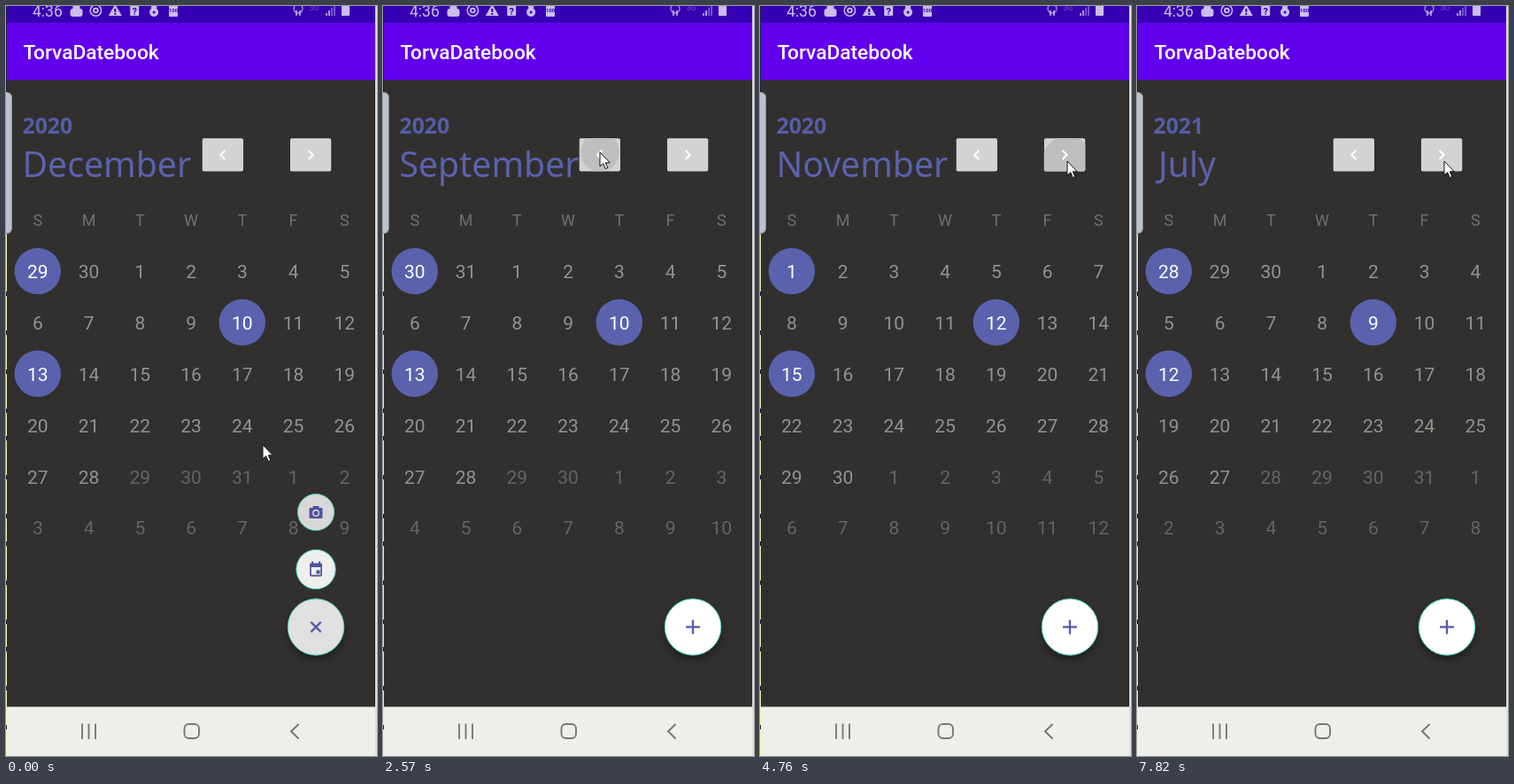
Animation of 419 by 846 pixels, one loop 8000 ms. Source, as an HTML page with a canvas:

```html
<!DOCTYPE html>
<html lang="en">
<head>
<meta charset="utf-8">
<title>Calendar</title>
<style>
html, body { margin: 0; width: 100%; height: 100%; overflow: hidden; background: #31302e; }
canvas { display: block; }
</style>
</head>
<body>
<canvas id="stage" width="419" height="846"></canvas>
<script>
const ctx = document.getElementById('stage').getContext('2d');
const LOOP = 8000;
const HOLD = 250;
const FADE = 130;
const RIPPLE_SPEED = 0.18;
const INDIGO = '#5a62ae';
const ICON_INK = '#4c529e';
const SANS = 'Roboto, sans-serif';
const HUMANIST = '"Noto Sans", "Open Sans", sans-serif';
const MONTHS = ['January', 'February', 'March', 'April', 'May', 'June', 'July',
  'August', 'September', 'October', 'November', 'December'];

// Release times of evenly repeated clicks.
const clicks = (first, gap, count) => Array.from({ length: count }, (_, i) => first + gap * i);
const BACK = [...clicks(660, 680, 4), 2970];
const FORWARD = [...clicks(3900, 238, 5), ...clicks(5390, 383, 7)];

const PARKED = { x: 290, y: 495 };
const ON_BACK = { x: 245, y: 165 };
const ON_FORWARD = { x: 347, y: 175 };

const clamp = v => Math.max(0, Math.min(1, v));
const progress = (t, from, to) => clamp((t - from) / (to - from));
const smooth = k => k * k * (3 - 2 * k);
const overshoot = k => 1 + 2.7 * (k - 1) ** 3 + 1.7 * (k - 1) ** 2;
const mix = (a, b, k) => ({ x: a.x + (b.x - a.x) * k, y: a.y + (b.y - a.y) * k });

function pointerAt(t) {
  return t < 3000
    ? mix(PARKED, ON_BACK, overshoot(progress(t, 40, 480)))
    : mix(ON_BACK, ON_FORWARD, smooth(progress(t, 3040, 3480)));
}

function rect(x, y, w, h, color, r = 0) {
  ctx.fillStyle = color;
  ctx.beginPath();
  ctx.roundRect(x, y, w, h, r);
  ctx.fill();
}

function disc(x, y, r, color) {
  ctx.fillStyle = color;
  ctx.beginPath();
  ctx.arc(x, y, r, 0, Math.PI * 2);
  ctx.fill();
}

function ring(x, y, r, color, width) {
  ctx.strokeStyle = color;
  ctx.lineWidth = width;
  ctx.beginPath();
  ctx.arc(x, y, r, 0, Math.PI * 2);
  ctx.stroke();
}

function line(x1, y1, x2, y2, color, width) {
  ctx.strokeStyle = color;
  ctx.lineWidth = width;
  ctx.beginPath();
  ctx.moveTo(x1, y1);
  ctx.lineTo(x2, y2);
  ctx.stroke();
}

function chevron(x, y, w, h, color, width) {
  ctx.strokeStyle = color;
  ctx.lineWidth = width;
  ctx.beginPath();
  ctx.moveTo(x - w / 2, y - h / 2);
  ctx.lineTo(x + w / 2, y);
  ctx.lineTo(x - w / 2, y + h / 2);
  ctx.stroke();
}

function text(str, x, y, font, color, align = 'left') {
  ctx.font = font;
  ctx.fillStyle = color;
  ctx.textAlign = align;
  ctx.fillText(str, x, y);
}

function at(x, y, draw, scale = 1, angle = 0) {
  ctx.save();
  ctx.translate(x, y);
  ctx.rotate(angle);
  ctx.scale(scale, scale);
  draw();
  ctx.restore();
}

function drawStatusBar() {
  const tint = '#cbbdec', dim = '#a994dd', bar = '#3700b3';
  const icons = [
    () => { rect(-7, 3, 14, 9, tint, 3); rect(-4, 0, 8, 3, tint); },
    () => { ring(0, 5, 6.2, tint, 1.5); ring(0, 5, 2.4, tint, 1.8); },
    () => {
      ctx.fillStyle = tint;
      ctx.fill(new Path2D('M0-2L7.5 11H-7.5Z'));
      rect(-1, 3, 2, 4, bar);
      rect(-1, 8, 2, 2, bar);
    },
    () => { rect(-5, -2, 10, 13, tint, 1); text('?', 0, 10, 'bold 11px ' + SANS, bar, 'center'); },
    () => { disc(0, 7, 5, tint); rect(-3, -2, 6, 6, tint, 2); disc(0, 7, 1.5, bar); },
    () => { rect(-5, -1, 10, 13, tint, 1); text('100', 0, 7, 'bold 6px ' + SANS, bar, 'center'); },
  ];
  rect(1, 0, 416, 20, bar);
  text('4:36', 30, 12, '17.5px ' + SANS, tint);
  icons.forEach((icon, i) => at(79.5 + i * 21.9, 0, icon));

  ring(330, 3, 5, dim, 1.3);
  line(328, 5, 328, 11, tint, 1.5);
  line(332, 5, 332, 11, tint, 1.5);
  text('3G', 348, 5, '9px ' + SANS, '#6f4cc8', 'center');
  for (let i = 0; i < 4; i++) rect(361 + i * 3, 8 - i * 3, 2, 3 + i * 3, i < 2 ? dim : '#7253c8');
  rect(379, -2, 9, 13, tint, 1);
}

function drawEdges() {
  rect(0, 0, 1, 256, '#1c2348');
  rect(0, 256, 1, 590, '#f5f0a6');
  for (let i = 0; i < 13; i++) rect(0, 322 + i * 40 + (i * 17) % 13, 1, 5, '#222');
  rect(417, 0, 2, 846, '#dededc');
  rect(0, 97, 7, 160, '#8f9094', [0, 6, 6, 0]);
  rect(0, 98, 6, 158, '#bcc2ce', [0, 5, 5, 0]);
}

function drawNavBar() {
  const ink = '#777776';
  rect(1, 790.5, 416, 56, '#eeefeb');
  for (let i = -1; i <= 1; i++) line(93.5 + i * 7.5, 809.5, 93.5 + i * 7.5, 827, ink, 1.9);
  ctx.beginPath();
  ctx.roundRect(201.5, 810, 16.5, 16, 5);
  ctx.stroke();
  chevron(326.3, 818.3, -8.5, 16.5, ink, 2);
}

function drawButton(x, dir, releases, t) {
  const pointer = pointerAt(t);
  ctx.save();
  ctx.beginPath();
  ctx.roundRect(x, 149.3, 46.5, 37.2, 2);
  ctx.clip();
  rect(x, 149, 47, 38, '#d3d3d2');
  for (const up of releases) {
    const held = t - up + HOLD;
    if (held < 0) continue;
    ctx.globalAlpha = 1 - progress(t, up, up + FADE);
    disc(pointer.x, pointer.y, held * RIPPLE_SPEED, '#bfbfbe');
  }
  ctx.restore();
  chevron(x + 23.3, 168, 5 * dir, 10, '#fff', 2.2);
}

function drawCalendar(t) {
  const released = times => times.filter(up => up <= t).length;
  const count = 11 - released(BACK) + released(FORWARD);
  const month = count % 12, name = MONTHS[month];
  text(2020 + Math.floor(count / 12), 18.5, 143.5, '600 24.8px ' + HUMANIST, '#555da6');
  // J hangs left of its origin, so it is indented.
  text(name, name[0] === 'J' ? 24 : 18.5, 193, '39.2px ' + HUMANIST, INDIGO);
  drawButton(221.5, -1, BACK, t);
  drawButton(320.8, 1, FORWARD, t);

  const colX = c => 35.8 + c * 57.75;
  [...'SMTWTFS'].forEach((d, c) => text(d, colX(c), 248.3, '18px ' + SANS, '#70706e', 'center'));

  // The grid follows the 2020 weekdays even after the year label advances.
  const offset = new Date(2020, month, 1).getDay();
  for (let i = 0; i < 42; i++) {
    const x = colX(i % 7), y = 299.5 + Math.floor(i / 7) * 57.8;
    const marked = [0, 11, 14].includes(i);
    if (marked) disc(x, y - 0.4, 26.2, INDIGO);
    const color = marked ? '#fff' : i < 30 ? '#929290' : '#646462';
    text(new Date(2020, month, 1 - offset + i).getDate(), x, y + 7.8, '21px ' + SANS, color, 'center');
  }
}

function ringedDisc(r, color) {
  disc(0, 0, r, color);
  ring(0, 0, r, '#3fc9b8', 1);
}

function drawCameraAction() {
  const face = '#d9d9d7';
  ringedDisc(20.7, face);
  rect(-7.5, -5, 15, 12, ICON_INK, 1.5);
  rect(-3.5, -7, 7, 3, ICON_INK, 1);
  disc(0, 1, 4, face);
  disc(0, 1, 2.6, ICON_INK);
}

function drawEventAction() {
  const face = '#f0f0ee';
  ringedDisc(22.3, face);
  rect(-7, -7, 14, 15, ICON_INK, 1.5);
  rect(-5.3, -2.5, 10.6, 8.7, face);
  for (const x of [-5, 3]) rect(x, -9, 2, 3, ICON_INK);
  rect(0.5, 1, 4, 4, ICON_INK);
}

function drawActions(t) {
  const open = 1 - progress(t, 0, 240);
  ctx.globalAlpha = open;
  at(350, 571, drawCameraAction, open);
  at(350, 635.5, drawEventAction, open);
  ctx.globalAlpha = 1;

  const shade = Math.round(255 - 31 * open);
  at(350, 700.5, () => {
    ctx.shadowColor = 'rgba(0,0,0,0.4)';
    ctx.shadowBlur = 9;
    ctx.shadowOffsetY = 5;
    disc(0, 0, 31.5, '#fff');
    ctx.shadowColor = 'transparent';
    ringedDisc(31.8, `rgb(${shade},${shade},${shade})`);
  });
  at(350, 700.5, () => {
    line(-8, 0, 8, 0, '#555bab', 2.3);
    line(0, -8, 0, 8, '#555bab', 2.3);
  }, 1, open * Math.PI / 4);
}

function drawPointer(t) {
  const { x, y } = pointerAt(t);
  const arrow = new Path2D('M0 0V16L3.7 12.7L6.3 18.5L8.8 17.4L6.3 11.8H11.3Z');
  at(x, y, () => {
    ctx.fillStyle = '#fff';
    ctx.fill(arrow);
    ctx.strokeStyle = '#111';
    ctx.lineWidth = 1;
    ctx.stroke(arrow);
  });
}

function render(t) {
  rect(0, 0, 419, 846, '#31302e');
  drawStatusBar();
  rect(1, 19, 416, 64.5, '#6200ee');
  text('TorvaDatebook', 19.5, 60, '500 22.7px ' + SANS, '#fff');
  drawEdges();
  drawCalendar(t);
  drawActions(t);
  drawNavBar();
  drawPointer(t);
}

const start = performance.now();
function tick() {
  render((performance.now() - start) % LOOP);
  requestAnimationFrame(tick);
}
tick();
</script>
</body>
</html>
```
